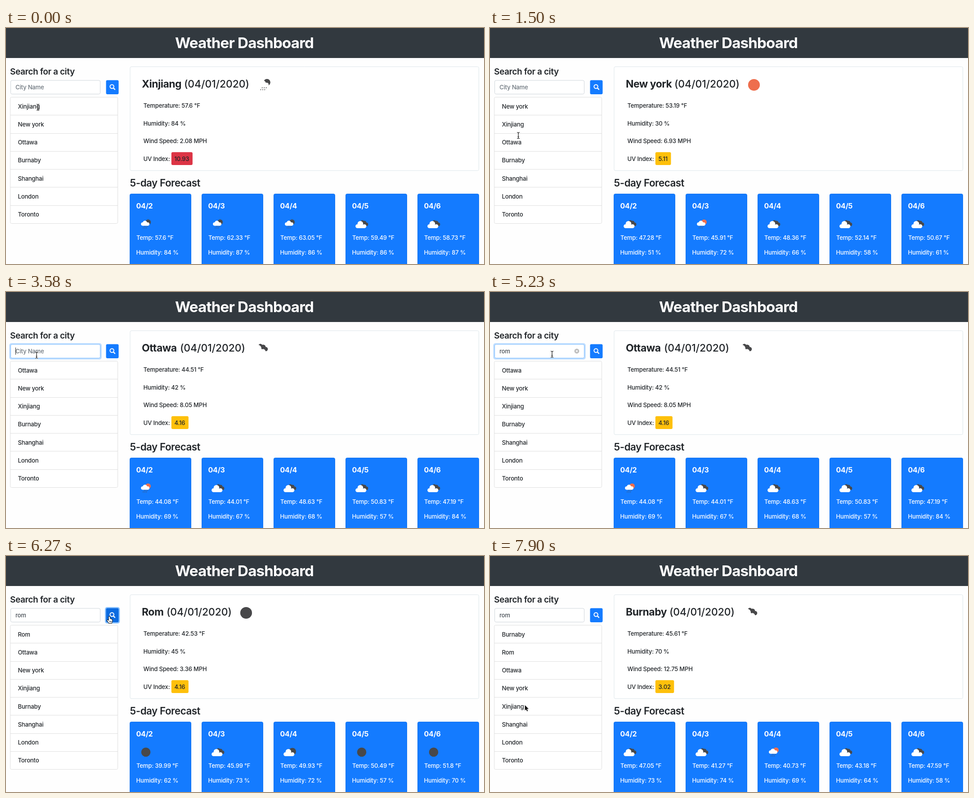
An HTML page with a canvas that plays this animation: 1063x527 px, repeating every 8000 ms.

```html
<!DOCTYPE html>
<html lang="en">
<head>
<meta charset="utf-8">
<title>Weather Dashboard</title>
<style>
  html, body { margin: 0; width: 100%; height: 100%; overflow: hidden; background: #fefefe; }
  canvas { display: block; width: 1063px; height: 527px; }
</style>
</head>
<body>
<canvas id="stage"></canvas>
<script>
const W = 1063, H = 527, LOOP = 8000;
const canvas = document.getElementById('stage');
const ctx = canvas.getContext('2d');
const dpr = window.devicePixelRatio || 1;
canvas.width = W * dpr;
canvas.height = H * dpr;

const INK = '#212529', DARK = '#48484a', SUN = '#ee6e4d', BLUE = '#147bff';
const RED = '#dc3445', AMBER = '#fec00b', PAGE = '#fefefe';

// Each forecast day: icon, temperature, humidity
const cities = {
  Xinjiang: {
    dateX: 397, endX: 541, icon: 'rainNight', now: ['57.6', 84, '2.08'], uv: '10.93',
    days: [['rainNight', '57.6', 84], ['rainNight', '62.33', 87], ['rainNight', '63.05', 86],
           ['clouds', '59.49', 86], ['clouds', '58.73', 87]]
  },
  'New york': {
    dateX: 411, endX: 554, icon: 'sun', now: ['53.19', 30, '6.93'], uv: '5.11',
    days: [['clouds', '47.28', 51], ['rainDay', '45.91', 72], ['clouds', '48.36', 66],
           ['clouds', '52.14', 58], ['clouds', '50.67', 61]]
  },
  Ottawa: {
    dateX: 388, endX: 531, icon: 'clouds', now: ['44.51', 42, '8.05'], uv: '4.16',
    days: [['rainDay', '44.08', 69], ['clouds', '44.01', 67], ['clouds', '48.63', 68],
           ['clouds', '50.83', 57], ['clouds', '47.19', 84]]
  },
  Rom: {
    dateX: 358, endX: 501, icon: 'moon', now: ['42.53', 45, '3.36'], uv: '5.03',
    days: [['moon', '39.99', 62], ['clouds', '45.99', 73], ['cloudNight', '49.93', 72],
           ['moon', '50.49', 57], ['moon', '51.8', 70]]
  },
  Burnaby: {
    dateX: 400, endX: 543, icon: 'clouds', now: ['45.61', 70, '12.75'], uv: '3.02',
    days: [['clouds', '47.05', 73], ['clouds', '41.27', 74], ['rainDay', '40.73', 69],
           ['clouds', '43.18', 64], ['clouds', '47.59', 58]]
  }
};

// Current weather, forecast and UV index arrive one after the other
const titleSteps = [[0, 'Xinjiang'], [1050, 'New york'], [2100, 'Ottawa'], [6130, 'Rom'], [7750, 'Burnaby']];
const daySteps = [[0, 'Xinjiang'], [1200, 'New york'], [2100, 'Ottawa'], [6270, 'Rom'], [7900, 'Burnaby']];
const uvSteps = [[0, 'Xinjiang'], [1350, 'New york'], [2100, 'Ottawa'], [6420, 'Rom'], [7900, 'Burnaby']];
const listSteps = [
  [0, 'Xinjiang,New york,Ottawa,Burnaby,Shanghai,London,Toronto'],
  [1050, 'New york,Xinjiang,Ottawa,Burnaby,Shanghai,London,Toronto'],
  [2100, 'Ottawa,New york,Xinjiang,Burnaby,Shanghai,London,Toronto'],
  [6130, 'Rom,Ottawa,New york,Xinjiang,Burnaby,Shanghai,London,Toronto'],
  [7750, 'Burnaby,Rom,Ottawa,New york,Xinjiang,Shanghai,London,Toronto']
];
const typeSteps = [[0, ''], [4330, 'r'], [4480, 'ro'], [4630, 'rom']];
const focusSteps = [[0, 0], [3430, 0.5], [3580, 1], [6130, 0]];
const caretSteps = [[0, 0], [3430, 1], [4030, 0], [4330, 1], [5230, 0], [5680, 1], [6130, 0]];
const cursorSteps = [
  [0, 71, 177, beam], [450, 71, 187, beam], [600, 70, 200, beam], [750, 69, 207, beam],
  [1350, 68, 217, beam], [1500, 63, 240, beam], [1650, 60, 254, beam],
  [2540, 61, 240, beam], [2690, 64, 198, beam], [2840, 67, 155, beam], [2990, 68, 141, beam],
  [5230, 138, 139, beam], [5380, 196, 142, beam], [5530, 229, 147, hand], [5680, 231, 139, hand],
  [5830, 230, 135, hand], [7020, 221, 158, arrow], [7170, 160, 236, arrow],
  [7310, 98, 312, arrow], [7460, 77, 332, arrow]
];

function at(steps, t) {
  let hit = steps[0];
  for (const s of steps) if (s[0] <= t) hit = s;
  return hit;
}

function setFont(size = 13.1, weight = 450, track = -0.015) {
  ctx.font = `${weight} ${size}px Inter, "Open Sans", sans-serif`;
  ctx.letterSpacing = track * size + 'px';
}

function text(str, x, y, color = INK, size, weight, track) {
  setFont(size, weight, track);
  ctx.fillStyle = color;
  ctx.fillText(str, x, y);
  return ctx.measureText(str).width;
}

function box(x, y, w, h, r, fill, line) {
  ctx.beginPath();
  ctx.roundRect(x, y, w, h, r);
  if (fill) { ctx.fillStyle = fill; ctx.fill(); }
  if (line) { ctx.strokeStyle = line; ctx.lineWidth = 1; ctx.stroke(); }
}

function dot(x, y, r, color) {
  ctx.fillStyle = color;
  ctx.beginPath();
  ctx.arc(x, y, r, 0, Math.PI * 2);
  ctx.fill();
}

function poly(points, fill, line, width) {
  ctx.beginPath();
  points.forEach(([x, y]) => ctx.lineTo(x, y));
  ctx.closePath();
  ctx.lineJoin = 'round';
  ctx.fillStyle = fill;
  ctx.strokeStyle = line;
  ctx.lineWidth = width;
  ctx.stroke();
  ctx.fill();
}

function bigCloud() {
  dot(-9.4, 4.6, 4.4, '#fff');
  dot(-3, -0.8, 6.2, '#fff');
  dot(6, 4.6, 4.4, '#fff');
  ctx.fillRect(-9.4, 2, 15.4, 7);
}

function rain(color) {
  dot(5, -4.5, 6, color);
  dot(-7, -0.2, 3.8, '#fff');
  dot(-2, -2.8, 5, '#fff');
  dot(4.2, -0.2, 3.8, '#fff');
  ctx.fillRect(-7, -1, 11.2, 4.6);
  ctx.strokeStyle = DARK;
  ctx.lineWidth = 1.1;
  ctx.beginPath();
  for (const [x, y] of [[-3, 4.2], [0.5, 4.2], [4, 4.2], [-5.5, 7.6], [-2, 7.6], [1.4, 7.6]]) {
    ctx.moveTo(x, y);
    ctx.lineTo(x - 0.7, y + 1.6);
  }
  ctx.stroke();
}

const icons = {
  sun: () => dot(0, 0, 10.3, SUN),
  moon: () => dot(0, 0, 10.3, DARK),
  rainNight: () => rain(DARK),
  rainDay: () => rain(SUN),
  cloudNight() { dot(6, -1.5, 8, DARK); bigCloud(); },
  clouds() {
    dot(1.4, -5.2, 3.6, DARK);
    dot(6.2, -3.1, 4.4, DARK);
    dot(10.6, 0.4, 3.8, DARK);
    bigCloud();
  }
};

function icon(name, x, y, scale) {
  ctx.save();
  ctx.translate(x, y);
  ctx.scale(scale, scale);
  icons[name]();
  ctx.restore();
}

function beam() {
  for (const [color, width] of [['rgba(255,255,255,.8)', 2.6], ['#151515', 1.2]]) {
    ctx.strokeStyle = color;
    ctx.lineWidth = width;
    ctx.beginPath();
    for (const s of [-1, 1]) {
      ctx.moveTo(-3, 7 * s);
      ctx.quadraticCurveTo(0, 7 * s, 0, 4.5 * s);
      ctx.quadraticCurveTo(0, 7 * s, 3, 7 * s);
    }
    ctx.moveTo(0, -5);
    ctx.lineTo(0, 5);
    ctx.moveTo(-1.6, 2.5);
    ctx.lineTo(1.6, 2.5);
    ctx.stroke();
  }
}

function hand() {
  poly([[-1.5, 1], [-0.4, 0], [1, 1], [1.4, 5.5], [3, 5.3], [4, 6.2], [5.5, 6.4], [6.3, 8],
        [6, 11.5], [4.8, 15], [-1, 15], [-2.4, 12.4], [-5, 9.4], [-4.6, 8], [-3, 8.2], [-1.2, 10]],
       '#fff', '#111', 2);
  ctx.lineWidth = 0.8;
  ctx.beginPath();
  for (const x of [0.4, 2.3, 4.1]) { ctx.moveTo(x, 10); ctx.lineTo(x, 13); }
  ctx.stroke();
}

function arrow() {
  poly([[0.5, 1], [0.5, 13], [3.3, 10.4], [5.2, 14.8], [7.2, 14], [5.3, 9.6], [9, 9.4]], '#111', '#fff', 2);
}

function searchBar(t) {
  const typed = at(typeSteps, t)[1], focus = at(focusSteps, t)[1];
  if (focus) box(7.2, 114.2, 205.6, 36.6, 5, `rgba(0,123,255,${0.25 * focus})`);
  box(10.5, 117, 199, 30.5, 3, '#fff', focus ? '#80bdff' : '#ced4da');
  const w = typed ? text(typed, 21, 136.7, '#495057') : 0;
  if (!typed) text('City Name', 21, 136.7, '#6c757d');
  if (at(caretSteps, t)[1]) {
    ctx.fillStyle = '#222';
    ctx.fillRect(Math.round(21 + w), 124, 1, 16);
  }
  if (typed && focus) {
    dot(193, 132, 5.4, '#bcbcbc');
    ctx.strokeStyle = '#fff';
    ctx.lineWidth = 1.3;
    ctx.beginPath();
    for (const s of [-1, 1]) { ctx.moveTo(191, 132 - 2 * s); ctx.lineTo(195, 132 + 2 * s); }
    ctx.stroke();
  }

  if (t >= 6130 && t < 7750) box(220, 114, 33.2, 36.8, 5, 'rgba(0,123,255,.45)');
  box(222.5, 116.5, 28, 31.5, 3, t >= 5530 && t < 7170 ? '#0c6be0' : BLUE);
  ctx.strokeStyle = '#fff';
  ctx.lineWidth = 2;
  ctx.beginPath();
  ctx.arc(235.6, 130.8, 4.2, 0, Math.PI * 2);
  ctx.stroke();
  ctx.lineWidth = 2.4;
  ctx.lineCap = 'round';
  ctx.beginPath();
  ctx.moveTo(239.2, 134.4);
  ctx.lineTo(242, 137.2);
  ctx.stroke();
  ctx.lineCap = 'butt';
}

function cityList(t) {
  const names = at(listSteps, t)[1].split(',');
  const edge = i => Math.round(154 + 40.27 * i) + 0.5;
  box(9.5, edge(0), 239, edge(names.length) - edge(0), 3, '#fff', '#dfdfdf');
  names.forEach((name, i) => {
    if (i) {
      ctx.fillStyle = '#dfdfdf';
      ctx.fillRect(10, edge(i) - 0.5, 238, 1);
    }
    text(name, 26.5, Math.round(179.7 + 40.25 * i));
  });
}

function current(t) {
  const name = at(titleSteps, t)[1], city = cities[name];
  const uv = cities[at(uvSteps, t)[1]].uv;
  box(276, 86.5, 775.5, 232, 3, '#fff', '#dde6ea');
  text(name, 302, 133, INK, 22.9, 700, -0.02);
  text('(04/01/2020)', city.dateX - 1, 133, INK, 22.9, 500, -0.003);
  icon(city.icon, city.endX + 33, 127, 1.27);

  const [temp, hum, wind] = city.now;
  text(`Temperature: ${temp} °F`, 305.5, 178.3);
  text(`Humidity: ${hum} %`, 305.5, 218);
  text(`Wind Speed: ${wind} MPH`, 305.5, 257);
  text('UV Index:', 305.5, 296.7);
  setFont();
  box(367.8, 277.3, ctx.measureText(uv).width + 14.2, 28.8, 3, uv > 8 ? RED : AMBER);
  text(uv, 374.5, 296.7);
}

function forecast(t) {
  text('5-day Forecast', 275.5, 354, INK, 22.3, 600, -0.02);
  cities[at(daySteps, t)[1]].days.forEach(([name, temp, hum], i) => {
    const x = 275.5 + 160 * i;
    box(x, 370.5, 136, 180, 3, BLUE, '#1372ee');
    text(`04/${i + 2}`, x + 14, 403, '#fff', 16, 700);
    icon(name, x + 35.5, 438, 1);
    text(`Temp: ${temp} °F`, x + 14.5, 473, '#fff', 13.1, 550);
    text(`Humidity: ${hum} %`, x + 14, 505.5, '#fff', 13.1, 550);
  });
}

function draw(t) {
  ctx.setTransform(dpr, 0, 0, dpr, 0, 0);
  ctx.fillStyle = PAGE;
  ctx.fillRect(0, 0, W, H);
  ctx.fillStyle = '#32393f';
  ctx.fillRect(0, 0, W, 67);
  ctx.textAlign = 'center';
  text('Weather Dashboard', 530, 45.3, '#fff', 33.1, 700, -0.025);
  ctx.textAlign = 'left';
  text('Search for a city', 9, 104, INK, 19, 600, -0.02);

  searchBar(t);
  cityList(t);
  current(t);
  forecast(t);

  const [, x, y, shape] = at(cursorSteps, t);
  ctx.save();
  ctx.translate(x, y);
  shape();
  ctx.restore();
}

function tick() {
  draw(performance.now() % LOOP);
  requestAnimationFrame(tick);
}
tick();
</script>
</body>
</html>
```
